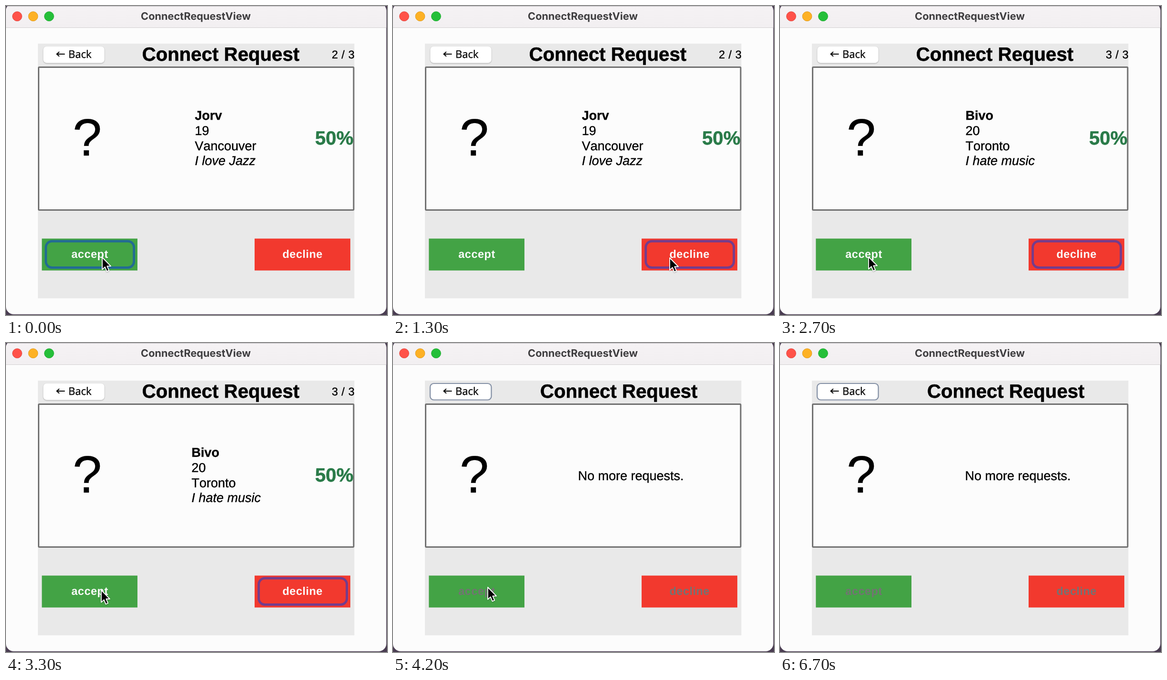
Recreate the animation shown at these times as an HTML page. Size 800 by 649 pixels, loop 6.8 s.

```html
<!DOCTYPE html>
<html lang="en">
<head>
<meta charset="utf-8">
<title>ConnectRequestView</title>
<style>
  html, body { margin: 0; width: 100%; height: 100%; overflow: hidden; background: #4a3d52; }
  svg { display: block; width: 800px; height: 649px; }
  text { font-family: "Liberation Sans", Arial, sans-serif; font-size: 27px; font-kerning: none;
         text-rendering: geometricPrecision; white-space: pre; stroke: currentColor; stroke-width: .35; }
  .bold { font-weight: 700; }
  .italic { font-style: italic; }
  .bar { font: 700 21.75px Inter, sans-serif; fill: #3e3d3f; text-anchor: middle; stroke: none; }
  .back { font: 500 22px "Open Sans", "Noto Sans", sans-serif; }
  .title { font-size: 40.2px; font-weight: 700; stroke-width: .6; }
  .match { font-size: 40.2px; font-weight: 700; fill: #2a7b49; stroke: #2a7b49; stroke-width: .6; }
  .mark { font-size: 110px; }
  .small { font-size: 23.5px; letter-spacing: .5px; }
  .label { font-weight: 700; fill: #fcfcfc; text-anchor: middle; stroke: none; }
  .ring { fill: none; stroke-width: 4.8; }
  .off .label { fill: #737373; }
</style>
</head>
<body>
<svg viewBox="0 0 800 649">
  <defs>
    <clipPath id="window"><rect y="-6" width="798.5" height="653.5" rx="16"/></clipPath>
    <linearGradient id="barFill" x2="0" y2="1">
      <stop offset="0" stop-color="#f5f2f4"/><stop offset="1" stop-color="#f2eff1"/>
    </linearGradient>
    <filter id="soft" x="-30%" y="-30%" width="160%" height="170%">
      <feDropShadow dx="0" dy="1" stdDeviation="1" flood-opacity=".35"/>
    </filter>
  </defs>
  <g clip-path="url(#window)">
    <rect width="800" height="649" fill="#fcfcfc"/>
    <rect width="800" height="45" fill="url(#barFill)"/>
    <rect y="45" width="800" height="1" fill="#d3d0d2"/>
    <rect width="800" height="1" fill="#b9b5b9"/>
  </g>
  <g stroke-width="1">
    <circle cx="23.5" cy="21.7" r="9.9" fill="#ff5249" stroke="#e2443c"/>
    <circle cx="57" cy="21.7" r="9.9" fill="#fdb125" stroke="#e09c1f"/>
    <circle cx="90.5" cy="21.7" r="9.9" fill="#25bf39" stroke="#1dab2f"/>
  </g>
  <text class="bar" x="398.5" y="28.6">ConnectRequestView</text>

  <rect x="67" y="79" width="664.5" height="535" fill="#e9e9e9"/>
  <rect id="backPlain" x="78.5" y="85" width="128" height="34.5" rx="7" fill="#fff" filter="url(#soft)"/>
  <rect id="backFocus" x="78" y="85" width="128.5" height="34.5" rx="7.5" fill="#fff" stroke="#8490a5" stroke-width="2.2"/>
  <path d="M123.5 101H107M112 96.3L106.6 101L112 105.7" fill="none" stroke="#000" stroke-width="2"/>
  <text class="back" x="131" y="108.8">Back</text>
  <text class="title" id="title" y="115">Connect Request</text>
  <text class="small" id="count" x="684" y="110.2"></text>

  <rect x="68.5" y="128.5" width="661.5" height="300" rx="1.5" fill="#fcfcfc" stroke="#717171" stroke-width="3"/>
  <text class="mark" x="140" y="313.7">?</text>
  <g id="info"></g>
  <text class="match" id="match" x="649" y="291">50%</text>

  <g id="buttons">
    <rect x="75.3" y="488.5" width="200.7" height="67" fill="#43a345"/>
    <rect x="522" y="488.5" width="201" height="67" fill="#f2392e"/>
    <rect class="ring" id="acceptRing" x="83.7" y="494" width="185" height="55.5" rx="13" stroke="#226b93"/>
    <rect class="ring" id="declineRing" x="530.7" y="494" width="185" height="55.5" rx="13" stroke="#743c8c"/>
    <text class="small label" x="176" y="528.6">accept</text>
    <text class="small label" x="622.7" y="528.6">decline</text>
  </g>
  <path id="cursor" d="M0 0V25.5L5.8 20.2L9.6 29.4L14.2 27.4L10.3 18.4H18Z" fill="#000" stroke="#fff"
        stroke-width="1.8" stroke-linejoin="round" filter="url(#soft)"/>
</svg>
<script>
const LOOP = 6800, STEP = 100;

const jazz = ["Jorv", "19", "Vancouver", "I love Jazz"];
const quiet = ["Bivo", "20", "Toronto", "I hate music"];

// Each step holds from its time until the next one.
const steps = [
  { at: 0, person: jazz, x: 396.5, count: "2 / 3", focus: "accept" },
  { at: 1200, person: jazz, x: 396.5, count: "2 / 3", focus: "decline" },
  { at: 1400, person: quiet, x: 389.5, count: "3 / 3", focus: "decline" },
  { at: 4000, person: quiet, x: 389.5, count: "3 / 3", focus: "accept" },
  { at: 4200, person: null, x: 388.5, count: "", focus: "back" },
];

// Pointer path: time, x, y.
const path = [
  [0, 202, 528], [300, 202, 528], [1000, 581, 529], [1600, 581, 529],
  [2300, 186, 527], [2900, 186, 527], [3600, 209, 514], [3800, 209, 514],
  [4100, 199, 513], [4300, 199, 513], [4800, 222, 670], [LOOP, 222, 670],
];

const $ = id => document.getElementById(id);
const show = (id, on) => $(id).style.display = on ? "" : "none";
const ease = p => p * p * (3 - 2 * p);

function addLine(text, x, y, style = "") {
  const el = document.createElementNS("http://www.w3.org/2000/svg", "text");
  el.setAttribute("x", x);
  el.setAttribute("y", y);
  el.setAttribute("class", style);
  el.textContent = text;
  $("info").append(el);
}

function showStep({ person, x, count, focus }) {
  $("info").replaceChildren();
  if (person) {
    const styles = ["bold", "", "", "italic"];
    person.forEach((text, i) => addLine(text, x, 239 + i * 31.8, styles[i]));
  } else {
    addLine("No more requests.", x, 287.5);
  }
  $("count").textContent = count;
  $("title").setAttribute("x", person ? 285.7 : 309);
  $("buttons").setAttribute("class", person ? "" : "off");
  show("match", person);
  show("acceptRing", focus === "accept");
  show("declineRing", focus === "decline");
  show("backPlain", focus !== "back");
  show("backFocus", focus === "back");
}

function pointerAt(t) {
  const i = path.findIndex(p => p[0] > t);
  const [t0, x0, y0] = path[i - 1], [t1, x1, y1] = path[i];
  const p = ease((t - t0) / (t1 - t0));
  return [x0 + (x1 - x0) * p, y0 + (y1 - y0) * p];
}

let current;
const start = performance.now();

function draw() {
  const t = Math.floor((performance.now() - start) % LOOP / STEP) * STEP;
  const step = steps.findLast(s => s.at <= t);
  if (step !== current) showStep(current = step);
  $("cursor").setAttribute("transform", `translate(${pointerAt(t)})`);
  requestAnimationFrame(draw);
}
draw();
</script>
</body>
</html>
```
